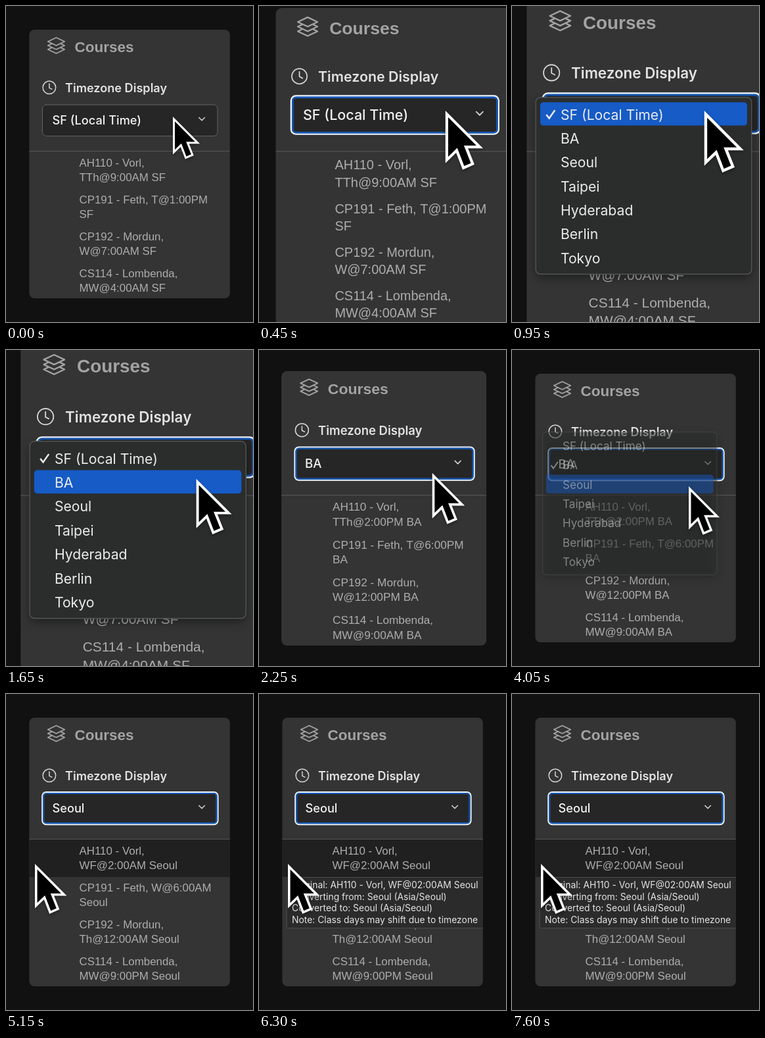
Recreate the animation shown at these times as an HTML page with a canvas. Size 376 px wide and 480 px high, loop 8000 ms.

```html
<!DOCTYPE html>
<html lang="en">
<head>
<meta charset="utf-8">
<title>Timezone Display</title>
<style>
  html, body { margin: 0; width: 100%; height: 100%; overflow: hidden; background: #111; }
  canvas { display: block; width: 376px; height: 480px; }
</style>
</head>
<body>
<canvas id="stage"></canvas>
<script>
const W = 376, H = 480, LOOP = 8000;
const canvas = document.getElementById('stage');
const ctx = canvas.getContext('2d');
const dpr = window.devicePixelRatio || 1;
canvas.width = W * dpr;
canvas.height = H * dpr;

const UI = 'Inter, "Open Sans", sans-serif';
const LIST = '"Liberation Sans", Arial, sans-serif';

const ZONES = ['SF (Local Time)', 'BA', 'Seoul', 'Taipei', 'Hyderabad', 'Berlin', 'Tokyo'];
const CITY = ['SF', 'BA', 'Seoul'];
const COURSES = [
  { name: 'AH110 - Vorl,', times: ['TTh@9:00AM', 'TTh@2:00PM', 'WF@2:00AM'] },
  { name: 'CP191 - Feth,', times: ['T@1:00PM', 'T@6:00PM', 'W@6:00AM'], inline: true },
  { name: 'CP192 - Mordun,', times: ['W@7:00AM', 'W@12:00PM', 'Th@12:00AM'] },
  { name: 'CS114 - Lombenda,', times: ['MW@4:00AM', 'MW@9:00AM', 'MW@9:00PM'] }
];
const TOOLTIP = [
  'Original: AH110 - Vorl, WF@02:00AM Seoul',
  'Converting from: Seoul (Asia/Seoul)',
  'Converted to: Seoul (Asia/Seoul)',
  'Note: Class days may shift due to timezone'
];

const MENUS = [
  { open: 520, close: 1730, current: 0, next: 1, hoverAt: 1130 },
  { open: 2900, close: 3960, current: 1, next: 2, hoverAt: 3520 }
];
const FADE = 170;
const PRESSES = [60, 1755, 2840, 3860];
// start, end, destination of the pointer tip
const MOVES = [
  [850, 1450, 251, 200],
  [1850, 2230, 260, 187.5],
  [3250, 3800, 269, 207],
  [4250, 5050, 44, 258]
];

const clamp = v => Math.max(0, Math.min(1, v));
const ease = p => p * p * (3 - 2 * p);
const spring = ms => {
  const x = Math.max(0, ms) * 0.008;
  return 1 - (1 + x) * Math.exp(-x);
};

function text(str, x, y, font, color) {
  ctx.font = font;
  ctx.fillStyle = color;
  ctx.fillText(str, x, y);
}

function box(x, y, w, h, r, fill, stroke, width = 1) {
  ctx.beginPath();
  ctx.roundRect(x, y, w, h, r);
  if (fill) { ctx.fillStyle = fill; ctx.fill(); }
  if (stroke) { ctx.strokeStyle = stroke; ctx.lineWidth = width; ctx.stroke(); }
}

function line(points, color, width, close) {
  ctx.beginPath();
  points.forEach(([x, y]) => ctx.lineTo(x, y));
  if (close) ctx.closePath();
  ctx.strokeStyle = color;
  ctx.lineWidth = width;
  ctx.stroke();
}

function drawHeader() {
  const grey = '#a3a3a3';
  ctx.lineJoin = ctx.lineCap = 'round';
  line([[76.5, 48], [89.2, 54], [76.5, 60], [63.8, 54]], grey, 1.9, true);
  for (const y of [60, 66]) {
    line([[69.5, y - 2.7], [63.8, y], [76.5, y + 6], [89.2, y], [83.5, y - 2.7]], grey, 1.9);
  }
  text('Courses', 104.5, 69.8, 'bold 22.5px ' + LIST, grey);

  ctx.beginPath();
  ctx.arc(65.9, 123.8, 9.8, 0, Math.PI * 2);
  ctx.strokeStyle = '#d4d4d4';
  ctx.lineWidth = 1.5;
  ctx.stroke();
  line([[65.9, 118], [65.9, 124.3], [69.9, 126.3]], '#d4d4d4', 1.5);
  text('Timezone Display', 90, 130.6, '600 18.1px ' + UI, '#e2e2e2');
}

function drawSelect(zone, focused) {
  box(55.5, 150, 266.5, 47.5, 6, '#262626', '#626262');
  if (focused) {
    box(55.2, 149, 267.4, 49.2, 6, null, '#f0f6ff', 2);
    box(57.2, 151, 263.4, 45.2, 4.5, null, '#1559b8', 2.2);
  }
  text(ZONES[zone], 70.5, 179.9, '500 18.2px ' + UI, '#f2f2f2');
  line([[293.8, 169.5], [298.1, 173.8], [302.4, 169.5]], '#d0d0d0', 1.6);
}

function drawCourses(zone, hover) {
  if (hover) {
    ctx.fillStyle = '#202020';
    ctx.fillRect(35, 221, 306, 57);
  }
  ctx.fillStyle = '#565656';
  ctx.fillRect(35, 220, 306, 1);
  COURSES.forEach((c, i) => {
    const y = 243.8 + i * 56, time = c.times[zone], city = CITY[zone];
    const rows = c.inline ? [c.name + ' ' + time, city] : [c.name, time + ' ' + city];
    rows.forEach((s, k) => text(s, 111.5, y + k * 22.2, '16.9px ' + LIST, '#adadad'));
  });
}

function drawTooltip() {
  box(42.5, 278.5, 330, 77, 0, '#2b2b2b', '#4c4c4c');
  TOOLTIP.forEach((s, i) => text(s, 50, 295 + i * 17.7, '13.9px ' + UI, '#e4e4e4'));
}

function drawMenu(menu, t) {
  if (t < menu.open || t > menu.close + FADE) return;
  const top = 154 - menu.current * 29.35;
  const active = t < menu.hoverAt ? menu.current : menu.next;
  ctx.save();
  ctx.globalAlpha = 1 - clamp((t - menu.close) / FADE);
  ctx.save();
  ctx.shadowColor = 'rgba(0,0,0,.4)';
  ctx.shadowBlur = 14 * dpr;
  ctx.shadowOffsetY = 5 * dpr;
  box(46.5, top, 265.5, 217, 6, '#2b2d2d');
  ctx.restore();
  box(46.5, top, 265.5, 217, 6, null, '#585a5a');
  ZONES.forEach((zone, i) => {
    const y = top + 21.2 + i * 29.35;
    if (i === active) box(52, y - 15.2, 254.5, 28.6, 4, '#165bc6');
    if (i === menu.current) line([[59.5, y], [63, y + 4.5], [70, y - 5.5]], '#ececec', 2);
    text(zone, 77, y + 6.2, '17.1px ' + UI, '#ececec');
  });
  ctx.restore();
}

function drawPointer(t) {
  let x = 254, y = 168;
  for (const [start, end, tx, ty] of MOVES) {
    const p = ease(clamp((t - start) / (end - start)));
    x += (tx - x) * p;
    y += (ty - y) * p;
  }
  const press = PRESSES.reduce((s, c) => s + Math.exp(-(((t - c) / 140) ** 2)), 0);
  const size = 3.75 * (1 - 0.18 * press);
  ctx.save();
  ctx.translate(x, y);
  ctx.scale(size, size);
  // the tip of the white outline is the anchor
  ctx.translate(0.95, 2.29);
  ctx.beginPath();
  [[0, 0], [0, 13.5], [3.1, 10.5], [5.5, 16.7], [7.8, 15.7], [5.4, 9.7], [9.7, 9.7]]
    .forEach(([px, py]) => ctx.lineTo(px, py));
  ctx.closePath();
  ctx.lineJoin = 'miter';
  ctx.lineWidth = 1.9;
  ctx.strokeStyle = '#fff';
  ctx.save();
  ctx.shadowColor = 'rgba(0,0,0,.35)';
  ctx.shadowBlur = 5 * dpr;
  ctx.shadowOffsetY = 2 * dpr;
  ctx.stroke();
  ctx.restore();
  ctx.fillStyle = '#000';
  ctx.fill();
  ctx.restore();
}

function draw(t) {
  const zone = MENUS.filter(m => t >= m.close + FADE).length;
  const zoom = 1 + 0.24 * (spring(t - 110) - spring(t - 1750));

  ctx.setTransform(dpr, 0, 0, dpr, 0, 0);
  ctx.fillStyle = '#111';
  ctx.fillRect(0, 0, W, H);

  ctx.save();
  ctx.translate(90, 218);
  ctx.scale(zoom, zoom);
  ctx.translate(-90, -218);

  ctx.save();
  ctx.beginPath();
  ctx.roundRect(35.4, 36, 305.4, 408, 8);
  ctx.clip();
  ctx.fillStyle = '#343434';
  ctx.fillRect(35, 36, 306, 408);
  drawHeader();
  drawSelect(zone, t >= 200);
  drawCourses(zone, t >= 4560);
  if (t >= 5800) drawTooltip();
  ctx.restore();

  MENUS.forEach(m => drawMenu(m, t));
  drawPointer(t);
  ctx.restore();
}

const begin = performance.now();
function tick() {
  draw((performance.now() - begin) % LOOP);
  requestAnimationFrame(tick);
}
tick();
</script>
</body>
</html>
```
